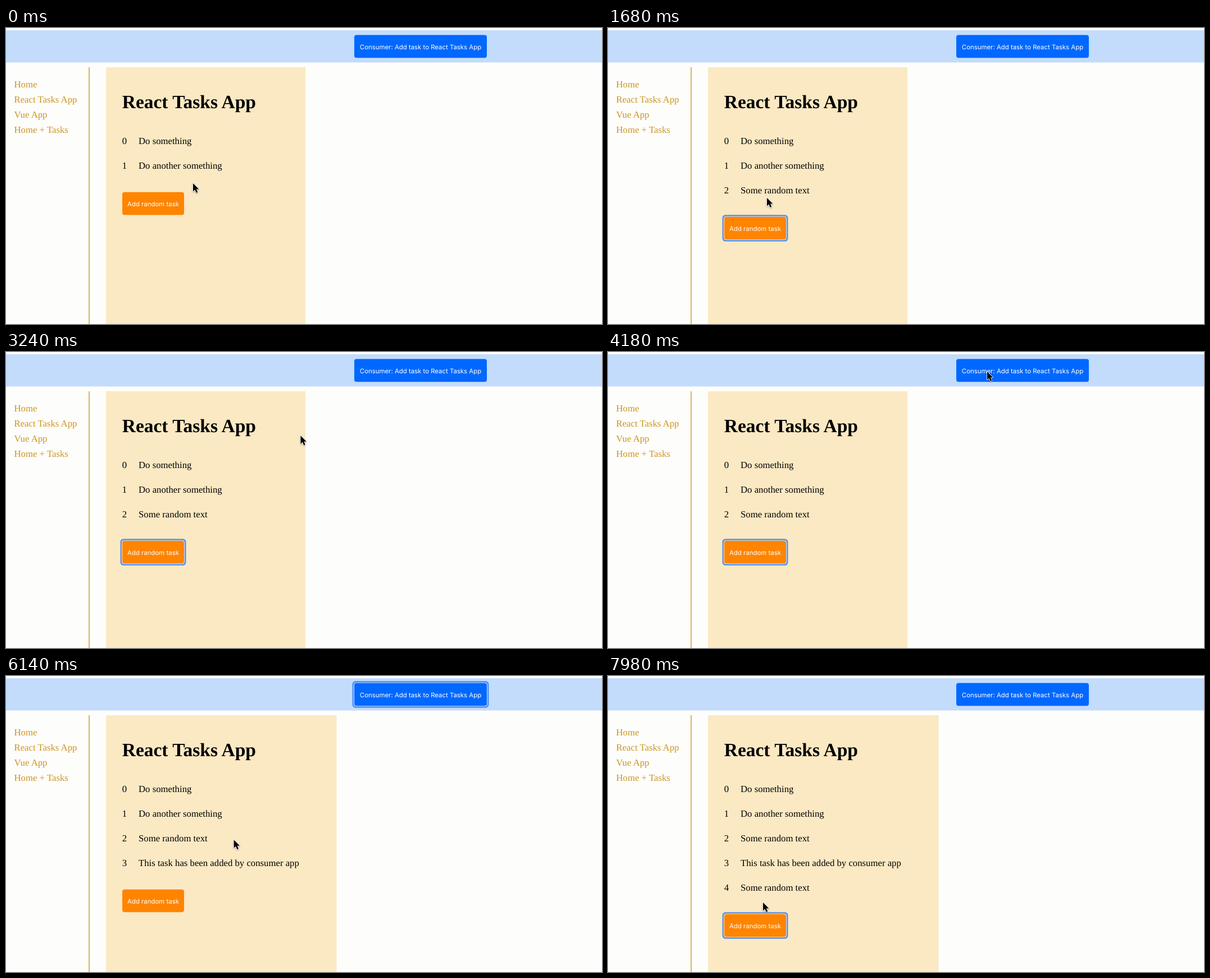
Write an HTML page that moves like this. It is 1061 px wide and 528 px high and loops after 8 s.

```html
<!DOCTYPE html>
<html lang="en">
<head>
<meta charset="utf-8">
<title>React Tasks App</title>
<style>
  html, body { margin: 0; width: 100%; height: 100%; overflow: hidden; background: #fdfdfc; }
  svg { display: block; width: 1061px; height: 528px; }
  text { font: 16.74px "Liberation Serif", "Times New Roman", serif; text-rendering: geometricPrecision; }
  h1, .title { font-size: 33.5px; font-weight: bold; }
  .link { fill: #cb9520; }
  .label { font: 11.4px Inter, "Open Sans", sans-serif; fill: #fff; text-anchor: middle; }
  .ring { fill: none; stroke: #3b80ee; stroke-opacity: .82; stroke-width: 3; }
  .gap { fill: none; stroke: #dfe9f8; stroke-width: 1; }
</style>
</head>
<body>
<svg viewBox="0 0 1061 528">
  <rect width="1061" height="4" fill="#fff"/>
  <rect y="4" width="1061" height="57.5" fill="#c3dcfc"/>
  <rect x="147.2" y="70" width="1.6" height="458" fill="#d2a440"/>
  <g id="links"></g>
  <rect id="panel" x="178" y="70" height="458" fill="#fbe9c3"/>
  <text class="title" x="206.7" y="142.7">React Tasks App</text>
  <g id="tasks"></g>
  <g id="add"></g>
  <g id="consumer"></g>
  <path id="cursor" d="M0 0V14.6L3.4 11.5L5.8 17L8.3 16L5.9 10.5H10.4Z" fill="#000"
    stroke="#fff" stroke-width="1.6" stroke-linejoin="round" paint-order="stroke"
    style="filter: drop-shadow(0 1px 1px rgba(0,0,0,.35))"/>
</svg>
<script>
const LOOP = 8000;
const $ = id => document.getElementById(id);

const links = ['Home', 'React Tasks App', 'Vue App', 'Home + Tasks'];
const tasks = [
  ['Do something', 0],
  ['Do another something', 0],
  ['Some random text', 1680],
  ['This task has been added by consumer app', 4640],
  ['Some random text', 7300]
];
// Pressing a button moves the focus ring to it.
const presses = [[1500, 'add'], [4500, 'consumer'], [7160, 'add']];
// Cursor moves: start, end, from, to.
const moves = [
  [20, 820, [333, 277], [283, 303]],
  [1740, 2500, [283, 303], [434, 218]],
  [2700, 4000, [434, 218], [675, 35]],
  [4760, 5340, [675, 35], [589, 134]],
  [5500, 6650, [589, 134], [276, 404]]
];

const button = (width, color, label) => `
  <g class="focus">
    <rect class="ring" x="-2" y="-2" width="${width + 4}" height="44.6" rx="4"/>
    <rect class="gap" x="-.4" y="-.4" width="${width + .8}" height="41.4" rx="4"/>
  </g>
  <rect width="${width}" height="40.6" rx="4" fill="${color}"/>
  <text class="label" x="${width / 2}" y="25">${label}</text>`;

$('links').innerHTML = links.map((name, i) =>
  `<text class="link" x="14.5" y="${105.8 + 27.2 * i}">${name}</text>`).join('');
$('tasks').innerHTML = tasks.map(([name], i) => {
  const y = 207.2 + 43.95 * i;
  return `<g><text x="206.7" y="${y}">${i}</text><text x="236" y="${y}">${name}</text></g>`;
}).join('');
$('add').innerHTML = button(110, '#ff8400', 'Add random task');
$('consumer').innerHTML = button(236, '#0068ff', 'Consumer: Add task to React Tasks App');

const place = (node, x, y) => node.setAttribute('transform', `translate(${x} ${y})`);
const show = (node, on) => node.setAttribute('visibility', on ? 'visible' : 'hidden');
const ease = p => p * p * (3 - 2 * p);

function cursorAt(t) {
  const [start, end, from, to] = moves.findLast(m => m[0] <= t) || moves[0];
  const p = ease(Math.min(1, Math.max(0, (t - start) / (end - start))));
  return from.map((v, i) => v + (to[i] - v) * p);
}

function draw() {
  const t = performance.now() % LOOP;
  const count = tasks.filter(task => task[1] <= t).length;
  const focused = presses.findLast(press => press[0] <= t)?.[1];

  $('panel').setAttribute('width', count > 3 ? 410.5 : 355);
  [...$('tasks').children].forEach((row, i) => show(row, i < count));
  place($('add'), 207, 292.8 + 43.95 * (count - 2));
  place($('consumer'), 620, 12.6);
  for (const id of ['add', 'consumer']) show($(id).querySelector('.focus'), focused === id);
  place($('cursor'), ...cursorAt(t));
  requestAnimationFrame(draw);
}
draw();
</script>
</body>
</html>
```
